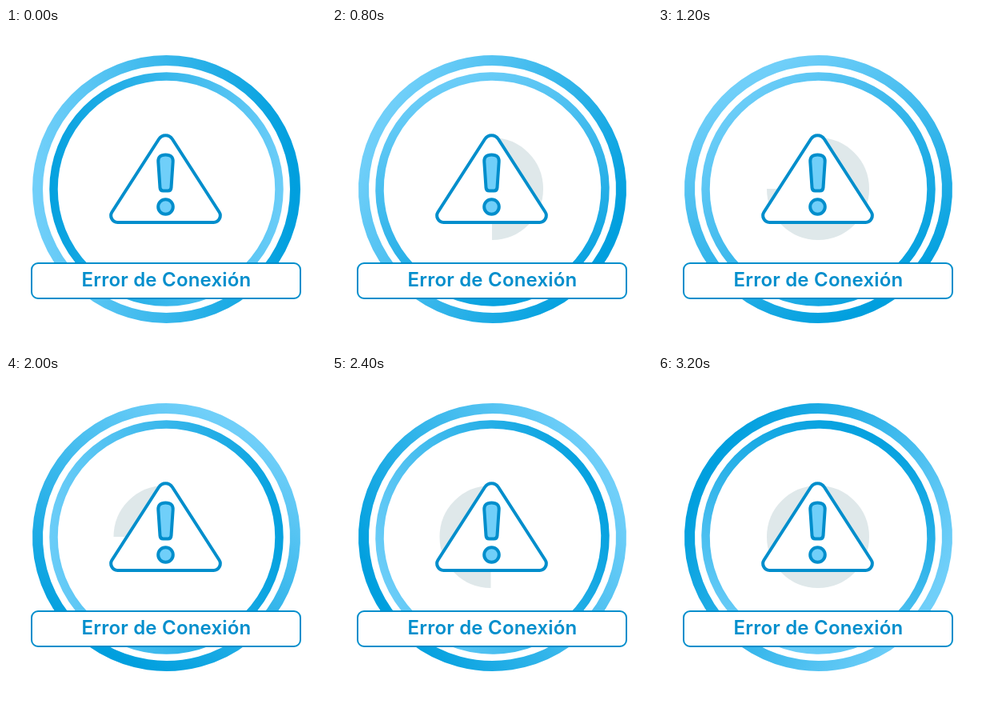
An HTML page that plays this animation: 400x400 px, repeating every 3.6 s.

```html
<!DOCTYPE html>
<html lang="es">
<head>
<meta charset="utf-8">
<title>Error de Conexión</title>
<style>
  html, body { margin: 0; width: 100%; height: 100%; overflow: hidden; background: #fff; }
  svg { display: block; width: 100%; height: 100%; }
  text { font: 600 24px Inter, sans-serif; letter-spacing: .2px; fill: #008ecc; }
  .line { stroke: #008ecc; stroke-width: 4; stroke-linejoin: round; }
</style>
</head>
<body>
<svg viewBox="0 0 400 400">
  <defs>
    <linearGradient id="blue" gradientUnits="userSpaceOnUse" x1="-160" x2="160" y1="0" y2="0">
      <stop stop-color="#70cff9"/>
      <stop offset="1" stop-color="#009fde"/>
    </linearGradient>
  </defs>
  <g fill="none" stroke="url(#blue)">
    <circle id="outer" r="161" stroke-width="13"/>
    <circle id="inner" r="141" stroke-width="10.5"/>
  </g>
  <circle id="disc" r="32" pathLength="4" fill="none" stroke="#dfe8ea" stroke-width="64"/>
  <path class="line" fill="#fff" d="M191 139A10 10 0 0 1 208 139L266.5 230A8.5 8.5 0 0 1 259.5 243H139.5A8.5 8.5 0 0 1 132.5 230Z"/>
  <g class="line" fill="#70cff9">
    <path d="M190.3 167Q189.800 158.500 199.500 158.500T208.700 167L206.500 199.500Q206.200 203.500 202.500 203.500H196.500Q192.800 203.500 192.500 199.500Z"/>
    <circle cx="199.500" cy="223.500" r="9.300"/>
  </g>
  <rect x="32" y="294" width="336" height="44" rx="8" fill="#fff" stroke="#008ecc" stroke-width="2"/>
  <text x="200.500" y="323" text-anchor="middle">Error de Conexión</text>
</svg>
<script>
  const STEP = 400, STEPS = 9;
  const [outer, inner, disc] = ["outer", "inner", "disc"].map(id => document.getElementById(id));
  const set = (el, name, value) => el.setAttribute(name, value);
  const turn = (el, angle) => set(el, "transform", `translate(200.500 201.500) rotate(${angle})`);

  function draw() {
    const i = Math.floor(performance.now() / STEP) % STEPS;
    turn(outer, Math.max(0, i - 1) * 30);
    turn(inner, i ? (5 - i) * 22.5 : 180);

    // The disc fills clockwise by quarters, then again anticlockwise.
    const quarters = i ? (i - 1) % 4 + 1 : 0;
    const side = i > 4 ? -1 : 1;
    set(disc, "visibility", quarters ? "visible" : "hidden");
    set(disc, "stroke-dasharray", quarters < 4 ? `${quarters} 4` : "none");
    set(disc, "transform", `translate(${side < 0 && quarters < 4 ? 198.5 : 200} 201) scale(${side} 1) rotate(-90)`);
    requestAnimationFrame(draw);
  }
  draw();
</script>
</body>
</html>
```
